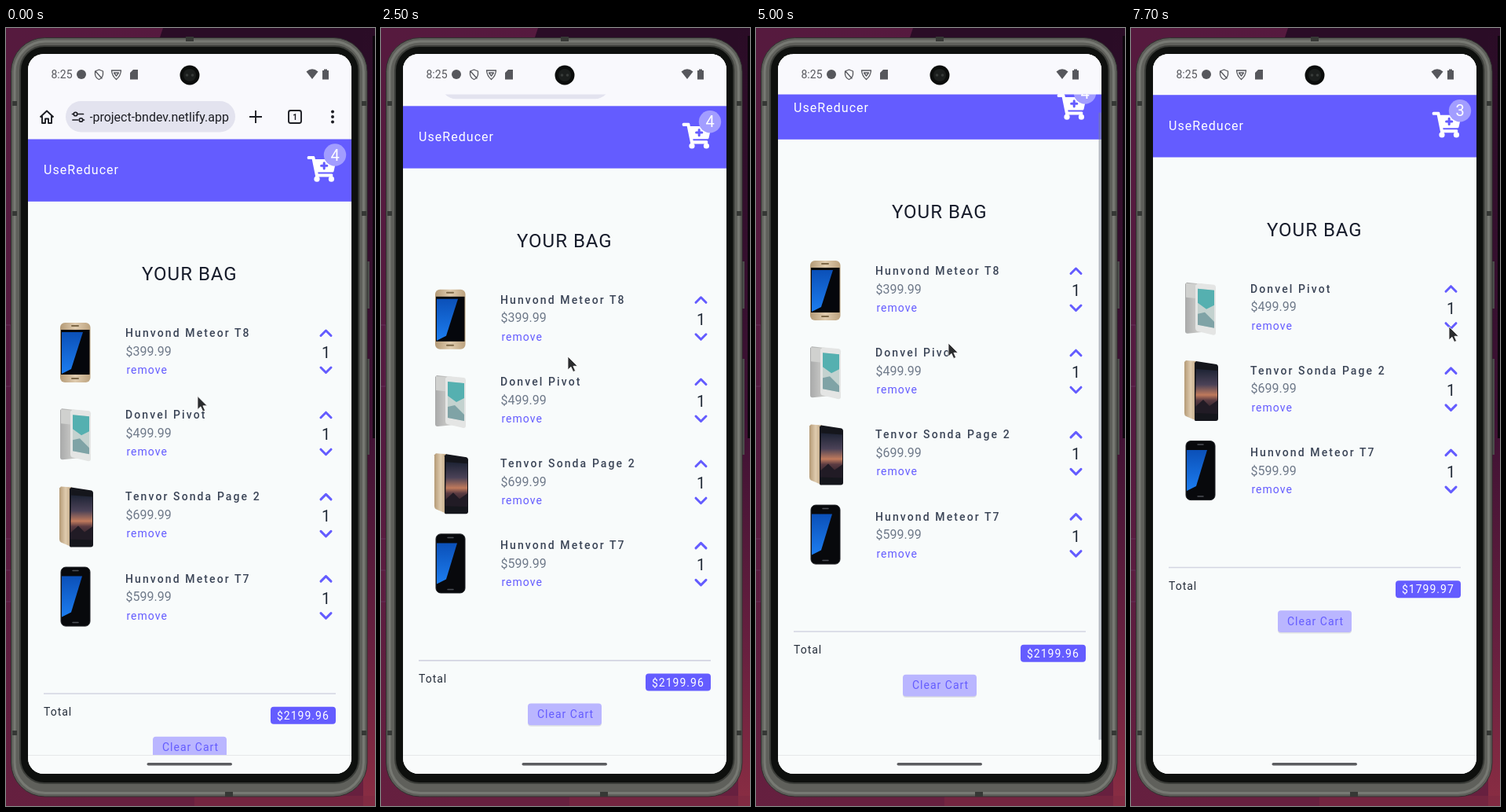
An HTML page that plays this animation: 470 px wide and 990 px high, repeating every 8000 ms.

```html
<!DOCTYPE html>
<html lang="en">
<head>
<meta charset="utf-8">
<title>Shopping bag on a phone</title>
<style>
html, body { margin: 0; width: 100%; height: 100%; overflow: hidden; background: #43173a; }
svg { display: block; width: 470px; height: 990px; font-family: Roboto, sans-serif; }
.spaced { font-size: 14px; letter-spacing: 1px; }
.name { font-size: 14px; font-weight: 500; letter-spacing: 2.1px; fill: #3b4557; }
.price { font-size: 16px; fill: #6f7a8a; }
.count { font-size: 20px; text-anchor: middle; fill: #222b38; }
.accent { fill: #645cff; }
.line { fill: none; stroke-linecap: round; stroke-linejoin: round; }
</style>
</head>
<body>
<svg viewBox="0 0 470 990">
  <defs>
    <linearGradient id="wall" x1="0" y1="0" x2=".2" y2="1">
      <stop offset="0" stop-color="#561a3e"/><stop offset=".5" stop-color="#541a40"/><stop offset="1" stop-color="#67203f"/>
    </linearGradient>
    <linearGradient id="wallRight" x1="0" y1="0" x2="0" y2="1">
      <stop offset="0" stop-color="#2a0c26"/><stop offset=".5" stop-color="#3d1133"/><stop offset=".8" stop-color="#68203f"/><stop offset="1" stop-color="#8a2d43"/>
    </linearGradient>
    <linearGradient id="sunset" x1="0" y1="0" x2="0" y2="1">
      <stop offset="0" stop-color="#1d2334"/><stop offset=".35" stop-color="#4b4257"/><stop offset=".58" stop-color="#c07a5c"/><stop offset=".7" stop-color="#5a3b42"/><stop offset="1" stop-color="#17141c"/>
    </linearGradient>
    <linearGradient id="gold"><stop offset="0" stop-color="#b49a76"/><stop offset=".5" stop-color="#dfcbae"/><stop offset="1" stop-color="#bca27e"/></linearGradient>
    <linearGradient id="silver"><stop offset="0" stop-color="#a9aaaa"/><stop offset="1" stop-color="#d9d9d6"/></linearGradient>
    <linearGradient id="blue" x1="0" y1="0" x2="0" y2="1"><stop offset="0" stop-color="#0b50b8"/><stop offset="1" stop-color="#1c7df0"/></linearGradient>
    <clipPath id="screen"><rect x="28" y="33" width="412" height="916" rx="20"/></clipPath>
    <clipPath id="address"><rect x="107" y="93" width="180" height="39"/></clipPath>

    <g id="goldPhone">
      <rect x="69" y="-13" width="38.500" height="76" rx="6" fill="url(#gold)"/>
      <rect x="70" y="-4" width="36.500" height="57" fill="#05070c"/>
      <path d="M71-1H98L83 46 71 52Z" fill="url(#blue)"/>
      <path class="line" d="M84-9H92M84 58H92" stroke="#7d6848" stroke-width="2"/>
    </g>
    <g id="silverPhone">
      <path d="M71-8 91-6Q93-5 93-3V55L72 57Q69 57 69 54V-6Z" fill="url(#silver)"/>
      <path d="M70-7 90-5V13L70 11Z" fill="#d0d1cf"/>
      <path d="M85-7 106-5Q108-4 108-2V56Q108 59 105 59L84 54Q82 53 82 50V-4Z" fill="#e4e5e4"/>
      <path d="M85 0 106 2V50L85 46Z" fill="#c3d2cf"/>
      <path d="M85 0 106 2V21L96 26 85 18Z" fill="#55b0b0"/>
      <path d="M85 32 94 30 106 42V50L85 46Z" fill="#7fa3a6"/>
    </g>
    <g id="sunsetPhone">
      <path d="M70-13 84-12V64L70 58Q68 57 68 54V-11Z" fill="url(#gold)"/>
      <path d="M83-12 109-8Q111-7 111-5V61Q111 64 108 64H82Q81 64 81 62V-10Z" fill="#15161c"/>
      <path d="M83-2 110 0V55L82 54Z" fill="url(#sunset)"/>
      <path d="M82 46 92 37 100 45 110 38V55L82 54Z" fill="#211b25"/>
    </g>
    <g id="blackPhone">
      <rect x="70" y="-14.500" width="37" height="75" rx="6" fill="#08090c" stroke="#1d1f23"/>
      <path d="M71-3H97L83 43 71 49Z" fill="url(#blue)"/>
      <path class="line" d="M85-10H92M85 56H92" stroke="#4c4f56" stroke-width="1.500"/>
    </g>
  </defs>

  <!-- desktop -->
  <rect width="470" height="990" fill="url(#wall)"/>
  <path d="M200 0H470V60H180Z" fill="#2a0c26"/>
  <rect x="455" width="15" height="990" fill="url(#wallRight)"/>
  <rect x="467" y="10" width="3" height="512" fill="#0c060c"/>
  <path d="M0 378H6V456H0M0 650H6M0 690H6V730H0" fill="none" stroke="#653158"/>
  <rect x="240" y="977" width="230" height="13" fill="#7d2841" opacity=".6"/>

  <!-- phone body -->
  <path d="M461 297V357M461 421V543" stroke="#4b4c4a" stroke-width="4"/>
  <rect x="6.500" y="12.500" width="453.500" height="965.500" rx="43" fill="#5f605b" stroke="#30312f"/>
  <rect x="11" y="17" width="444.500" height="956.500" rx="39" fill="none" stroke="#777973" stroke-width="3"/>
  <rect x="18" y="23" width="431.500" height="938" rx="31" fill="#0e100e" stroke="#3a3c38" stroke-width="2"/>
  <path d="M229 14H239M279 975H289M8 96H14M8 236H14M8 897H14M453 96H459M453 236H459M453 897H459" stroke="#363835" stroke-width="6"/>

  <g clip-path="url(#screen)">
    <rect x="28" y="33" width="412" height="916" fill="#f8fbfb"/>
    <g id="page">
      <!-- browser bar -->
      <rect x="28" y="60" width="412" height="82" fill="#f9f9fd"/>
      <rect x="76" y="93" width="216" height="39.500" rx="19.700" fill="#e3e3ef"/>
      <g class="line" stroke="#1d1e24" stroke-width="1.900">
        <path d="M43.500 113.500 52 105.500 60.500 113.500M46 112V121H50V115.500H54V121H58V112" stroke-linecap="butt"/>
        <path d="M84.500 109.500H86M91.500 109.500H98.500M85 117H91.500M98 117H99.500" stroke-width="1.700"/>
        <circle cx="88.500" cy="109.500" r="2.300" stroke-width="1.600"/><circle cx="95.500" cy="117" r="2.300" stroke-width="1.600"/>
        <path d="M318 105V121M310 113H326" stroke-linecap="butt"/>
        <rect x="360" y="105" width="16" height="16" rx="2.500"/>
      </g>
      <g fill="#1d1e24">
        <circle cx="416" cy="106.500" r="2"/><circle cx="416" cy="113" r="2"/><circle cx="416" cy="119.500" r="2"/>
        <text x="368" y="117" font-size="10" font-weight="700" text-anchor="middle">1</text>
        <g clip-path="url(#address)"><text x="284" y="119" font-size="16" text-anchor="end">-project-bndev.netlify.app</text></g>
      </g>

      <!-- site header -->
      <rect class="accent" x="28" y="141.500" width="412" height="79.300"/>
      <text x="48" y="186" font-size="16" letter-spacing="1.050" fill="#fff">UseReducer</text>
      <g transform="translate(383.700 163) scale(.064)" fill="#fff">
        <path d="M24 0H127Q146 0 150 19L159 64H552Q580 66 575 93L528 301Q523 320 505 320H212L218 352H487Q514 355 510 381L502 416H180Q166 416 164 407L94 64H24Q0 64 0 40V24Q0 0 24 0Z"/>
        <circle cx="192" cy="456" r="56"/><circle cx="480" cy="456" r="56"/>
        <path class="line" d="M336 136V248M280 192H392" stroke="#645cff" stroke-width="48"/>
      </g>
      <circle cx="419" cy="161.500" r="14.200" fill="#a29dff"/>
      <text id="badge" x="419" y="168.500" font-size="20" text-anchor="middle" fill="#fff"></text>

      <text x="173" y="321" font-size="24" letter-spacing="1" fill="#171c2b">YOUR BAG</text>
      <g id="rows"></g>
      <g id="footer">
        <path d="M48 847H420" stroke="#d3d5e2" stroke-width="1.700"/>
        <text class="spaced" x="48" y="875" fill="#252d3a">Total</text>
        <rect class="accent" x="337" y="863.800" width="83" height="22" rx="4"/>
        <text id="total" class="spaced" x="345" y="879.800" fill="#fff"></text>
        <rect x="187" y="903.500" width="94" height="27.500" rx="4" fill="#000" opacity=".1"/>
        <rect x="187" y="901.800" width="94" height="27.600" rx="4" fill="#bab6ff"/>
        <text class="spaced accent" x="199" y="920.300">Clear Cart</text>
      </g>
    </g>
    <rect id="thumb" x="436.500" width="4" fill="#7f8494"/>

    <!-- system bars -->
    <rect x="28" y="33" width="412" height="51.500" fill="#f9f9fd"/>
    <rect x="28" y="925" width="412" height="24" fill="#f9fbfb"/>
    <path d="M28 925.500H440" stroke="#e6e8ea"/>
    <rect x="179.500" y="935" width="108.500" height="3.600" rx="1.800" fill="#5c5d60"/>
    <g fill="#56575c">
      <text x="57.500" y="64" font-size="14">8:25</text>
      <circle cx="96" cy="59" r="6"/>
      <path d="M162 53H168V65.500H158V57Z"/>
      <path d="M382.500 55.500Q390 49 397.500 55.500L390 65Z"/>
      <path d="M405 52.500H409V54H411V65.500H403V54H405Z"/>
    </g>
    <g class="line" stroke="#56575c" stroke-width="1.300">
      <path d="M118.500 53 123.500 55V59Q123 63.500 118.500 65.500 114 63.500 113.500 59V55ZM114 55 122 64"/>
      <path d="M134.500 54H146.500Q146 61 140.500 65.500 135 61 134.500 54ZM137.500 57H143.500L140.500 61Z"/>
    </g>
    <circle cx="234" cy="60" r="12.500" fill="#0b0d0c"/>
    <circle cx="234" cy="60" r="8" fill="#1b1e1d"/>
    <circle cx="230.500" cy="60" r="1.800" fill="#383c3a"/><circle cx="237.500" cy="60" r="1.800" fill="#383c3a"/>
  </g>
  <path id="cursor" d="M0 0V17L4 13.300 6.800 19.500 9.600 18.300 6.900 12.300H12.300Z" fill="#2b2c2e" stroke="#fff" stroke-width=".8"/>
</svg>
<script>
const LOOP = 8000, STEP = 100, PITCH = 104.2, REMOVED_AT = 7600, BAR = 56.3;
const $ = id => document.getElementById(id);

const items = [
  ["goldPhone", "Hunvond Meteor T8", 399.99],
  ["silverPhone", "Donvel Pivot", 499.99],
  ["sunsetPhone", "Tenvor Sonda Page 2", 699.99],
  ["blackPhone", "Hunvond Meteor T7", 599.99]
];

// time, value...
const scroll = [
  [400, 0], [900, -10.5], [1300, -16], [1600, -21], [1800, -21], [2500, -42.2],
  [2800, -42.2], [3100, -BAR], [3700, -BAR], [4000, -22.5], [4300, 0], [4400, 0],
  [5000, -79], [5300, -81], [5400, -80], [5800, -59], [6200, -42.2], [6600, -42.2], [7000, -BAR]
];
const pointer = [
  [400, 244, 468.5], [900, 244, 448], [1300, 243, 442], [1600, 242, 437], [1800, 242, 437],
  [2500, 238, 418], [2800, 238, 418], [3100, 238, 404], [3700, 239, 404], [4000, 245, 449.5],
  [4300, 246, 474], [4400, 246, 474], [5000, 245, 401], [5300, 245, 399], [5800, 253, 432],
  [6200, 256, 449], [6600, 256, 449], [7100, 405.5, 380.5], [7200, 405.5, 380.5], [7300, 405, 380]
];

function sample(track, t) {
  const next = track.findIndex(k => k[0] > t);
  if (next === 0) return track[0].slice(1);
  if (next < 0) return track[track.length - 1].slice(1);
  const a = track[next - 1], b = track[next];
  const p = (t - a[0]) / (b[0] - a[0]);
  return a.slice(1).map((v, i) => v + (b[i + 1] - v) * p);
}

const move = (el, x, y) => el.setAttribute("transform", `translate(${x} ${y})`);

$("rows").innerHTML = items.map(([picture, name, price]) => `
  <g>
    <use href="#${picture}"/>
    <text class="name" x="152" y="5">${name}</text>
    <text class="price" x="152.500" y="28.500">$${price}</text>
    <text class="spaced accent" x="153.500" y="52">remove</text>
    <path class="line" d="M401 3.500 407.500-3 414 3.500M401 44 407.500 50.500 414 44" stroke="#645cff" stroke-width="3"/>
    <text class="count" x="407.500" y="32">1</text>
  </g>`).join("");
const rows = [...$("rows").children];

function draw(now) {
  const t = Math.floor(now % LOOP / STEP) * STEP;
  const [y] = sample(scroll, t);
  const gone = t >= REMOVED_AT ? 1 : 0;

  move($("page"), 0, y);
  move($("cursor"), ...sample(pointer, t));

  rows.forEach((row, i) => {
    row.style.display = i < gone ? "none" : "";
    move(row, 0, 388 + (i - gone) * PITCH);
  });
  move($("footer"), 0, -gone * PITCH);
  const left = items.slice(gone);
  $("badge").textContent = left.length;
  $("total").textContent = "$" + left.reduce((sum, item) => sum + item[2], 0).toFixed(2);

  const shown = Math.max(0, y + BAR);
  $("thumb").setAttribute("y", 85 + Math.abs(y + BAR));
  $("thumb").setAttribute("height", 798 - shown * 1.9);
  const fade = Math.min(1, Math.max(0, (6500 - t) / 300));
  $("thumb").setAttribute("opacity", t >= 4900 ? fade * 0.5 : 0);
}

function tick() {
  draw(performance.now());
  requestAnimationFrame(tick);
}
tick();
</script>
</body>
</html>
```
